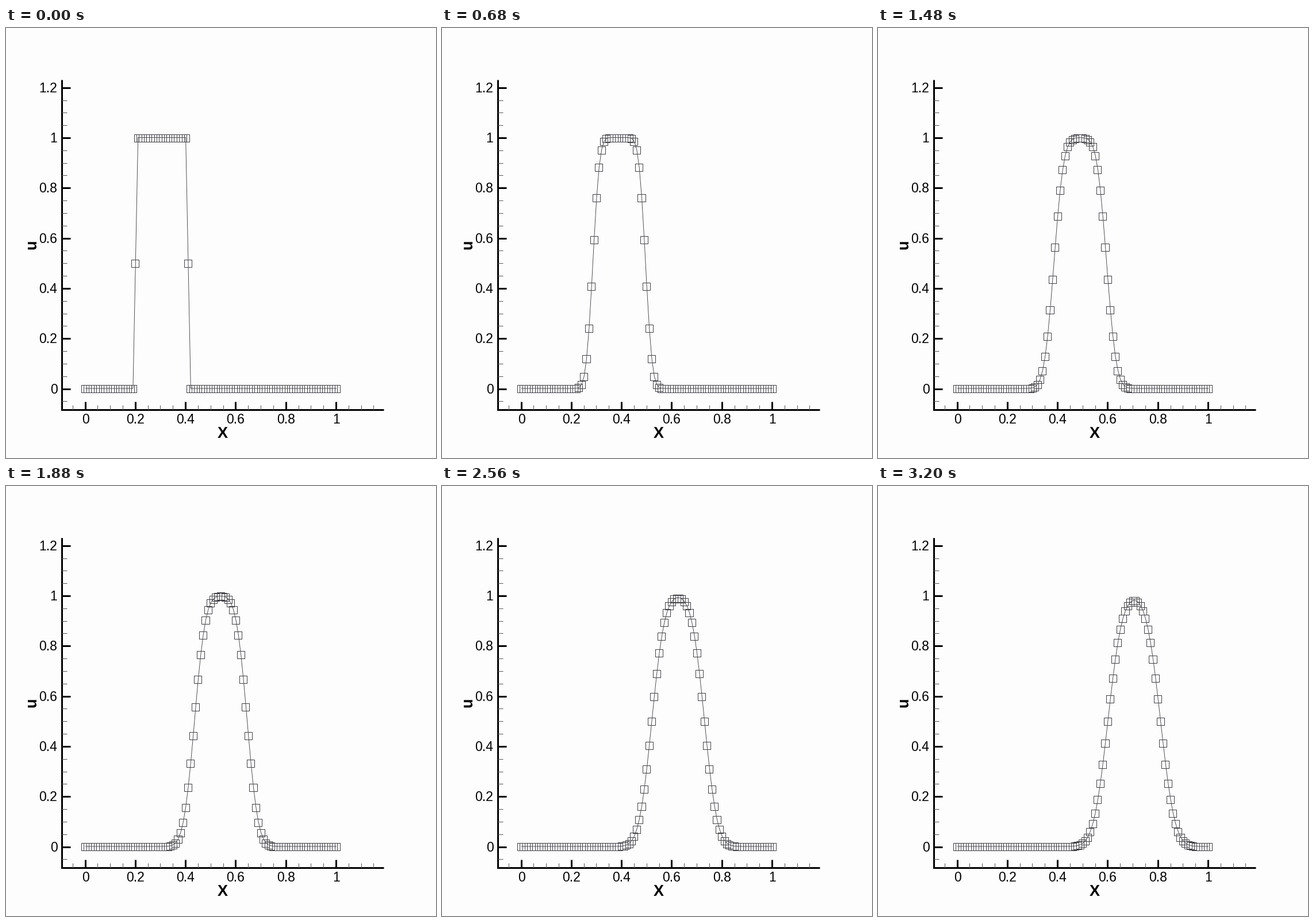
Write a matplotlib script that moves like this. It is 748x748 px and loops after 3.24 s.

```python
import numpy as np
import matplotlib.pyplot as plt
from matplotlib.animation import FuncAnimation
from matplotlib.collections import PolyCollection

SIZE, DPI = 748, 100
FRAMES, INTERVAL = 81, 40
X0, Y0, UNIT = 138.0, 627.0, 436.5   # pixel of the data zero, pixels per unit
LEFT, RIGHT, TOP, BOTTOM = 97.5, 657, 90, 663.5
CELLS = 100
INK = '#424248'


def pt(px):
    return px * 72 / DPI


def px_x(x):
    return X0 + UNIT * x


def px_y(u):
    return Y0 - UNIT * u


def snap(v):
    return np.floor(v) + 0.5


fig = plt.figure(figsize=(SIZE / DPI, SIZE / DPI), dpi=DPI, facecolor='#fdfdfd')
ax = fig.add_axes([0, 0, 1, 1])
ax.set_xlim(0, SIZE)
ax.set_ylim(SIZE, 0)
ax.axis('off')


def stroke(xs, ys, width, color='black'):
    ax.plot(xs, ys, color=color, lw=pt(width), solid_capstyle='butt',
            solid_joinstyle='miter')


def label(x, y, text, size=23, **kw):
    ax.text(x, y, text, fontsize=pt(size), family='Liberation Sans',
            color='black', **kw)


def draw_axes():
    stroke([LEFT, LEFT, RIGHT], [TOP, BOTTOM, BOTTOM], 3)
    for k in range(-1, 25):
        value = k / 20
        major = k % 4 == 0
        length, width = (15, 3) if major else (9, 1)
        color = 'black' if major else '#55555c'
        x, y = snap(px_x(value)), snap(px_y(value))
        stroke([LEFT, LEFT + length], [y, y], width, color)
        if x < RIGHT:
            stroke([x, x], [BOTTOM, BOTTOM - length + 1], width, color)
        if major:
            text = f'{value:g}'
            label(89.5, y + 8, text, ha='right', va='baseline')
            if x < RIGHT:
                label(x, 688.5, text, ha='center', va='baseline')
    label(376.8, 713, 'X', 27, weight='bold', ha='center', va='baseline')
    label(45, 376.5, 'u', 27, weight='bold', rotation=90,
          ha='center', va='center')


draw_axes()

cell = np.arange(CELLS + 1)
x_line = px_x(cell / CELLS)
# Marker width is three cells, so edges of neighbours share pixel columns.
edges = snap(X0 + UNIT / CELLS * (np.arange(CELLS + 4) - 1.5))
lefts, rights = edges[:-3], edges[3:]

curve, = ax.plot([], [], color=INK, lw=pt(0.9), zorder=3)
boxes = PolyCollection([], facecolors='none', edgecolors=INK,
                       linewidths=pt(1), zorder=4)
ax.add_collection(boxes, autolim=False)


def solve(steps):
    """Upwind advection of a square pulse at Courant number 0.5."""
    u = ((cell >= 20) & (cell <= 40)).astype(float)
    for _ in range(steps):
        u[1:] = 0.5 * (u[1:] + u[:-1])
    return u


def update(i):
    y = px_y(solve(i + 1))
    curve.set_data(x_line, y)
    top = snap(y - 6.5)
    low = top + 13
    corners = [(lefts, top), (rights, top), (rights, low), (lefts, low)]
    boxes.set_verts(np.stack([np.column_stack(c) for c in corners], axis=1))
    return curve, boxes


anim = FuncAnimation(fig, update, frames=FRAMES, interval=INTERVAL,
                     repeat=True, repeat_delay=0)
plt.show()
```
